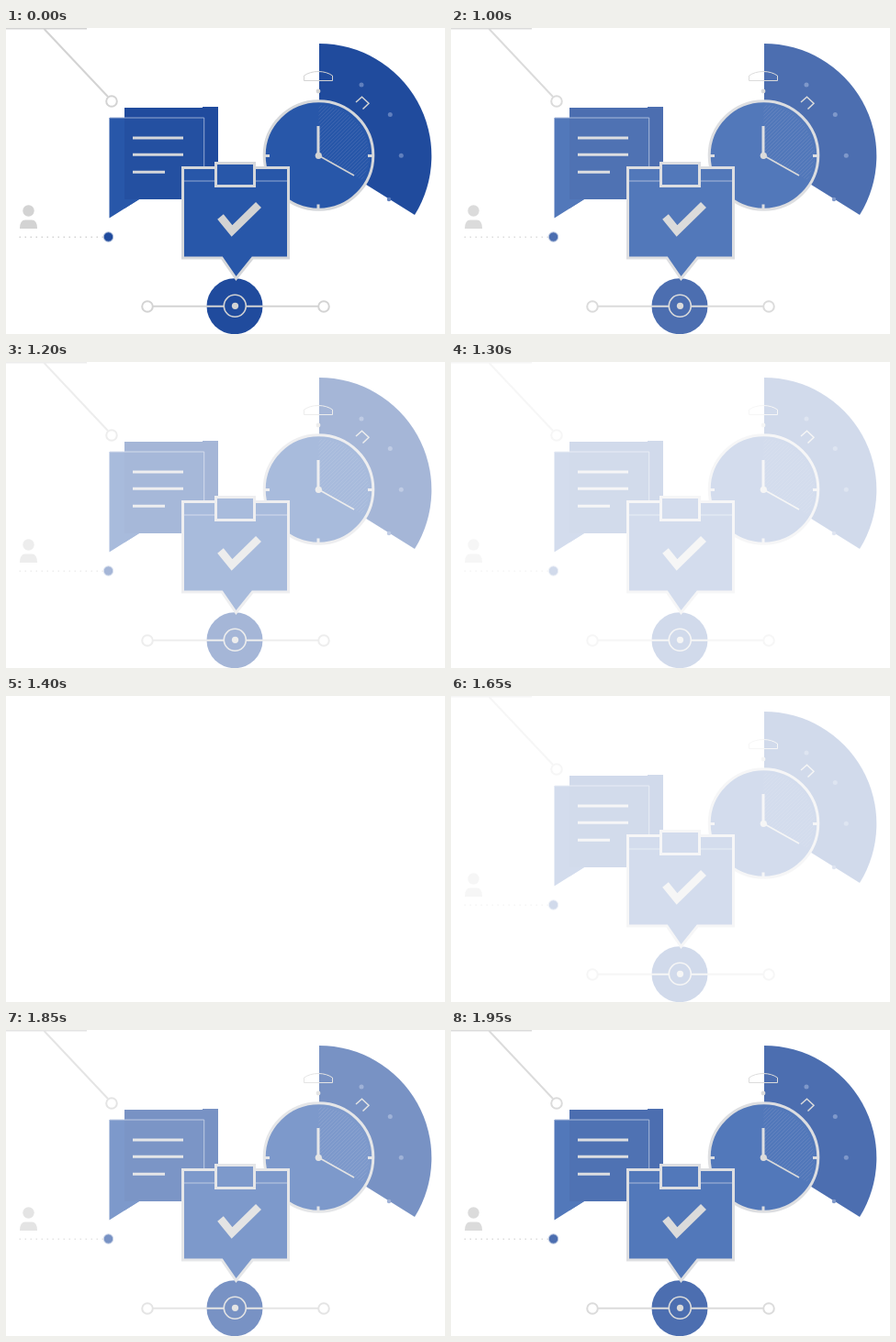
An HTML page that plays this animation: 478x334 px, repeating every 2050 ms.

```html
<!DOCTYPE html>
<html lang="en">
<head>
<meta charset="utf-8">
<title>Task icons</title>
<style>
html, body { margin: 0; width: 100%; height: 100%; overflow: hidden; background: #fff; }
svg { display: block; }
.dark { fill: #204b9d; }
.blue { fill: #2857a9; }
.gray { fill: #d3d3d3; }
.line { stroke: #d3d3d3; stroke-width: 2; }
.bold { stroke: #d5d7da; stroke-width: 3; }
.thin { stroke: #94a9d2; stroke-width: 1; }
.spot { fill: #607fbd; }
.open { fill: none; }
.ring { fill: #fff; }
</style>
</head>
<body>
<svg id="art" width="478" height="334" viewBox="0 0 478 334">
  <defs>
    <pattern id="hatch" width="4" height="4" patternUnits="userSpaceOnUse">
      <path d="M-1 1L1 -1M0 4L4 0M3 5L5 3" stroke="#4268b2" stroke-width=".8"/>
    </pattern>
  </defs>

  <!-- Connector and user -->
  <path class="line open" d="M0 .5H88M41.5 1L111 75"/>
  <circle class="line ring" cx="115" cy="80" r="5.8"/>
  <circle class="gray" cx="24.5" cy="199.5" r="6.2"/>
  <path class="gray" d="M15 219Q15 209.5 21 209.5H28Q34 209.5 34 219Z"/>
  <path class="line open" d="M14.5 228.2H106" stroke-dasharray="1.5 4.5" style="stroke-width:1.5"/>
  <circle cx="111.5" cy="228" r="5.2" fill="#204b9d" stroke="#a9b9d8"/>

  <!-- Chat bubbles -->
  <path class="dark" d="M129 87H214V86H231V187H129Z"/>
  <path class="blue" d="M112.5 98H216V187H145L112.5 207.5Z"/>
  <path fill="#2450a1" d="M129 98H216V187H129Z"/>
  <path class="blue" d="M129 187H145L129 197Z"/>
  <path class="thin open" d="M113 98H215.7V187"/>
  <path class="bold open" d="M138 120H193M138 138.3H193M138 157.3H173"/>

  <!-- Clock and sector -->
  <path class="dark" d="M341 139V17A122.5 122.5 0 0 1 445 204Z"/>
  <g class="spot">
    <circle cx="387" cy="62" r="2.5"/>
    <circle cx="418.3" cy="94.5" r="2.5"/>
    <circle cx="430.3" cy="139.3" r="2.5"/>
    <circle cx="417" cy="187" r="2.2"/>
  </g>
  <circle class="gray" cx="340" cy="69" r="2.4"/>
  <path class="line open" d="M324.5 57.5V52Q331 47.5 340 47.5T355.5 52V57.5Z" style="stroke-width:1"/>
  <path class="line open" d="M381 81L387.5 75.3L395 82.3L388.5 88.5" style="stroke-width:1.5"/>
  <circle class="blue" cx="340.5" cy="139" r="59.3"/>
  <path fill="url(#hatch)" d="M340.5 139V84A55 55 0 0 1 388 166Z"/>
  <circle class="bold open" cx="340.5" cy="139" r="59.3"/>
  <path class="bold open" d="M281 139.5H287M394 139.5H400M340 192.5V198M340 107V139"/>
  <path class="line open" d="M340 139L379 161" style="stroke-width:1.5"/>
  <circle class="gray" cx="340.3" cy="139.3" r="3.6"/>

  <!-- Timeline marker -->
  <circle class="dark" cx="249" cy="303.7" r="30.5"/>
  <path class="line open" d="M160 303.7H237M262 303.7H340"/>
  <circle class="line ring" cx="154" cy="304" r="5.8"/>
  <circle class="line ring" cx="346" cy="304" r="5.8"/>
  <circle class="line open" cx="249.3" cy="303.3" r="12" style="stroke-width:1.6"/>
  <circle class="gray" cx="249.5" cy="303.3" r="3.6"/>

  <!-- Clipboard -->
  <path class="blue bold" d="M192.5 152.5H307.5V251H268.5L250.5 273.5L235 251H192.5Z"/>
  <path class="thin" d="M194 167H306"/>
  <path class="blue bold" d="M228.5 147.5H270.5V172.5H228.5Z"/>
  <path class="open" d="M233.5 206L246 221.5L275 193" stroke="#d3d3d3" stroke-width="8.5"/>
</svg>
<script>
const art = document.getElementById("art");
const LOOP = 2050, STEP = 100, OUT = 1000, IN = 1650;

function opacityAt(t) {
  if (t < OUT) return 1;
  const level = t < IN
    ? 4 - Math.floor((t - OUT) / STEP)
    : 1 + Math.floor((t - IN) / STEP);
  return Math.max(0, level) / 5;
}

const start = performance.now();
function draw() {
  art.style.opacity = opacityAt((performance.now() - start) % LOOP);
  requestAnimationFrame(draw);
}
draw();
</script>
</body>
</html>
```
